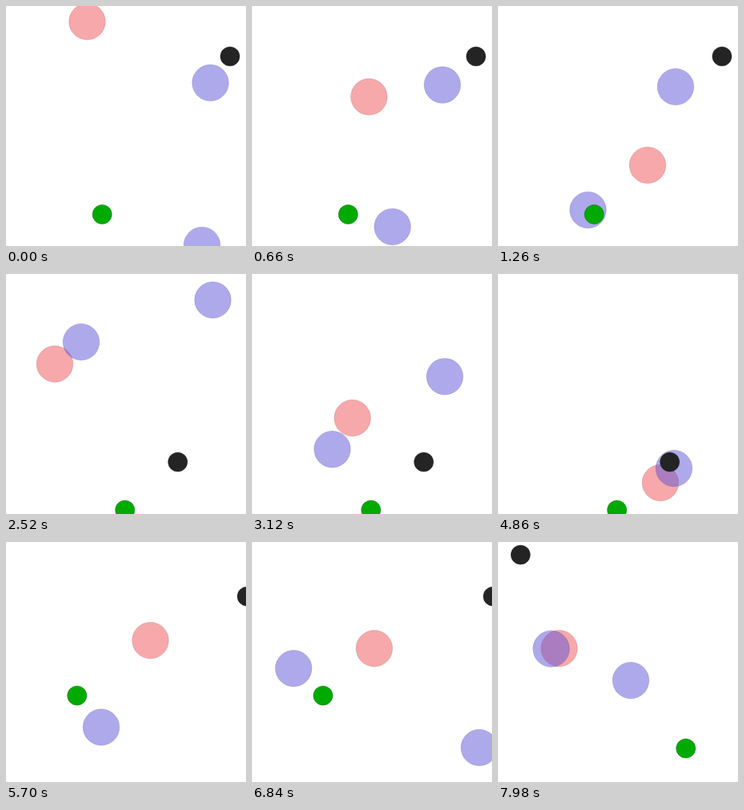
Animation, 300 px wide and 300 px high, one loop 8000 ms. Source, as an HTML page:

```html
<!DOCTYPE html>
<html lang="en">
<head>
<meta charset="utf-8">
<title>Moving discs</title>
<style>
html, body { margin: 0; width: 100%; height: 100%; overflow: hidden; background: #fff; }
svg { display: block; width: 100vw; height: 100vh; }
circle { stroke-width: .7; }
.chaser { fill: #f7a8aa; stroke: rgba(108, 45, 45, .25); }
.runner { fill: rgba(95, 85, 215, .5); stroke: rgba(45, 45, 108, .25); }
.goal { fill: #00aa00; stroke: rgba(0, 70, 0, .5); }
.decoy { fill: #242424; stroke: rgba(20, 20, 20, .5); }
</style>
</head>
<body>
<svg viewBox="0 0 300 300"><g id="stage"></g></svg>
<script>
const LOOP = 8000, STEP = 60, EPISODE = 2520;

// Agents cross the first leg at constant speed and settle over the second.
const episodes = [
  { goal: [120.2, 260.5], decoy: [280, 63], legs: [1260, 1260], agents: [
    [[101.5, 19.5], [187, 199]],
    [[255.5, 96], [222, 101], [235, 58]],
    [[245, 299], [112.5, 255]]
  ] },
  { goal: [148.7, 295], decoy: [214.7, 235], legs: [1320], agents: [
    [[61, 112.5], [203, 261]],
    [[94, 85], [108, 380]],
    [[258.5, 32.5], [220, 243]]
  ] },
  { goal: [88.8, 192], decoy: [301.2, 68], legs: [660, 1140], agents: [
    [[203, 96], [180.5, 123], [152.8, 133]],
    [[165, 268], [119, 231.5], [52, 158]],
    [[268, 265], [336, 268], [284, 257]]
  ] },
  { goal: [234.8, 258], decoy: [28.2, 16], legs: [420], agents: [
    [[78, 100], [76.5, 133]],
    [[70, 96], [66.5, 133.5]],
    [[168, 180], [166, 173]]
  ] }
];

const stage = document.getElementById('stage');

function disc(kind, r) {
  const c = document.createElementNS('http://www.w3.org/2000/svg', 'circle');
  c.setAttribute('class', kind);
  c.setAttribute('r', r);
  return stage.appendChild(c);
}

function place(c, [x, y]) {
  c.setAttribute('cx', x);
  c.setAttribute('cy', y);
}

const agents = ['chaser', 'runner', 'runner'].map(kind => disc(kind, 22.8));
const goal = disc('goal', 12.1);
const decoy = disc('decoy', 12.1);

const clamp = u => Math.min(1, Math.max(0, u));
const settle = u => 1 - (1 - u) ** 2;
const mix = (a, b, u) => a.map((v, i) => v + (b[i] - v) * u);

function along([from, via, to = via], [first, second = 1], t) {
  return t < first
    ? mix(from, via, t / first)
    : mix(via, to, settle(clamp((t - first) / second)));
}

function draw(ms) {
  const t = Math.floor((ms % LOOP) / STEP) * STEP;
  const ep = episodes[Math.floor(t / EPISODE)];
  agents.forEach((c, i) => place(c, along(ep.agents[i], ep.legs, t % EPISODE)));
  place(goal, ep.goal);
  place(decoy, ep.decoy);
}

let begin;
function tick(now) {
  begin ??= now;
  draw(Math.max(0, now - begin));
  requestAnimationFrame(tick);
}
draw(0);
requestAnimationFrame(tick);
</script>
</body>
</html>
```
